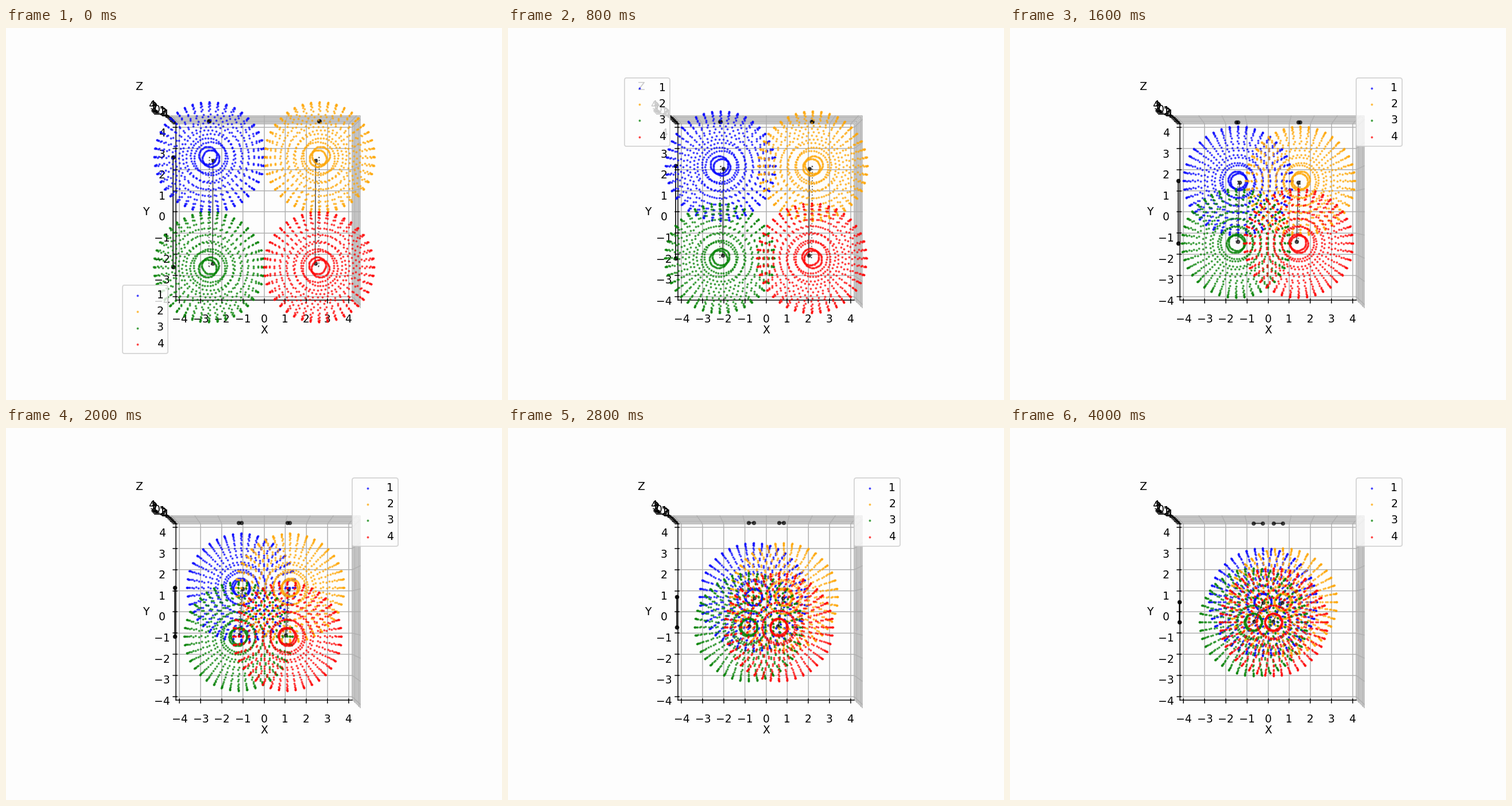
Recreate the animation shown at these times as a matplotlib script. Size 864 by 648 pixels, loop 4100 ms.

```python
import numpy as np
import matplotlib.pyplot as plt
from matplotlib.animation import FuncAnimation

FRAMES, STEP_MS = 41, 100
PAPER = "#fdfdfd"
COLORS = ["blue", "orange", "green", "red"]
PAIRS = [(0, 2), (1, 3)]
RADIUS = 2.43
WALL = 4

# distance of the sphere centres from the axes, over time in seconds
spread = np.polynomial.Polynomial.fit(
    [0, 0.4, 1.1, 1.6, 2.4, 3.2, 4.0],
    [2.42, 2.287, 1.80, 1.386, 0.847, 0.573, 0.45], 5)

# unit sphere: 40 meridians, 19 parallels
lon, lat = np.meshgrid(np.arange(40) * np.pi / 20,
                       np.arange(1, 20) * np.pi / 20)
sphere = RADIUS * np.array([np.cos(lon) * np.sin(lat),
                            np.sin(lon) * np.sin(lat),
                            np.cos(lat)]).reshape(3, -1)

fig = plt.figure(figsize=(6.4, 4.8), dpi=135, facecolor=PAPER)
ax = fig.add_subplot(projection="3d", facecolor=PAPER)
ax.view_init(elev=90, azim=-90)

limit = WALL * 25 / 24
ticks = range(-4, 5)
ax.set(xlim=(-limit, limit), ylim=(-limit, limit), zlim=(-limit, limit),
       xticks=ticks, yticks=ticks, zticks=ticks,
       xlabel="X", ylabel="Y", zlabel="Z")
for axis in (ax.xaxis, ax.yaxis, ax.zaxis):
    axis.pane.set_visible(False)

drawn = []


def centers(t):
    c = float(spread(t))
    skew = 0.01 + 0.0128 * t * t
    return np.array([[skew - c, c, c], [c + skew, c, c],
                     [-c - skew, -c, c], [c - skew, -c, c]])


def draw_line(points, style):
    drawn.extend(ax.plot(*np.transpose(points), style, color="black",
                         lw=1, alpha=0.6))


def flatten(points, axis, value):
    flat = points.copy()
    flat[:, axis] = value
    return flat


def draw_scene(t):
    while drawn:
        drawn.pop().remove()
    pos = centers(t)
    for i, color in enumerate(COLORS):
        drawn.append(ax.scatter(*(sphere + pos[i][:, None]), c=color,
                                s=5, marker=".", alpha=0.6,
                                depthshade=False, label=str(i + 1)))
    floor = flatten(pos, 2, -WALL)
    for a, b in PAIRS:
        pair = pos[[a, b]]
        draw_line(pair, ":")
        for axis, value in ((0, -WALL), (1, WALL), (2, -WALL)):
            draw_line(flatten(pair, axis, value), ".-")
    for top, foot in zip(pos, floor):
        draw_line([top, foot], ":")


draw_scene(0)
legend = ax.legend(loc="lower left", facecolor=PAPER)


def update(frame):
    draw_scene(frame * STEP_MS / 1000)
    if frame < 8:
        legend.set_loc("lower left")
    elif frame < 12:
        legend.set_loc("upper left")
    else:
        legend.set_loc("upper right")
    return drawn


anim = FuncAnimation(fig, update, frames=FRAMES, interval=STEP_MS,
                     init_func=lambda: [], repeat=True, repeat_delay=0,
                     blit=False)
plt.show()
```
